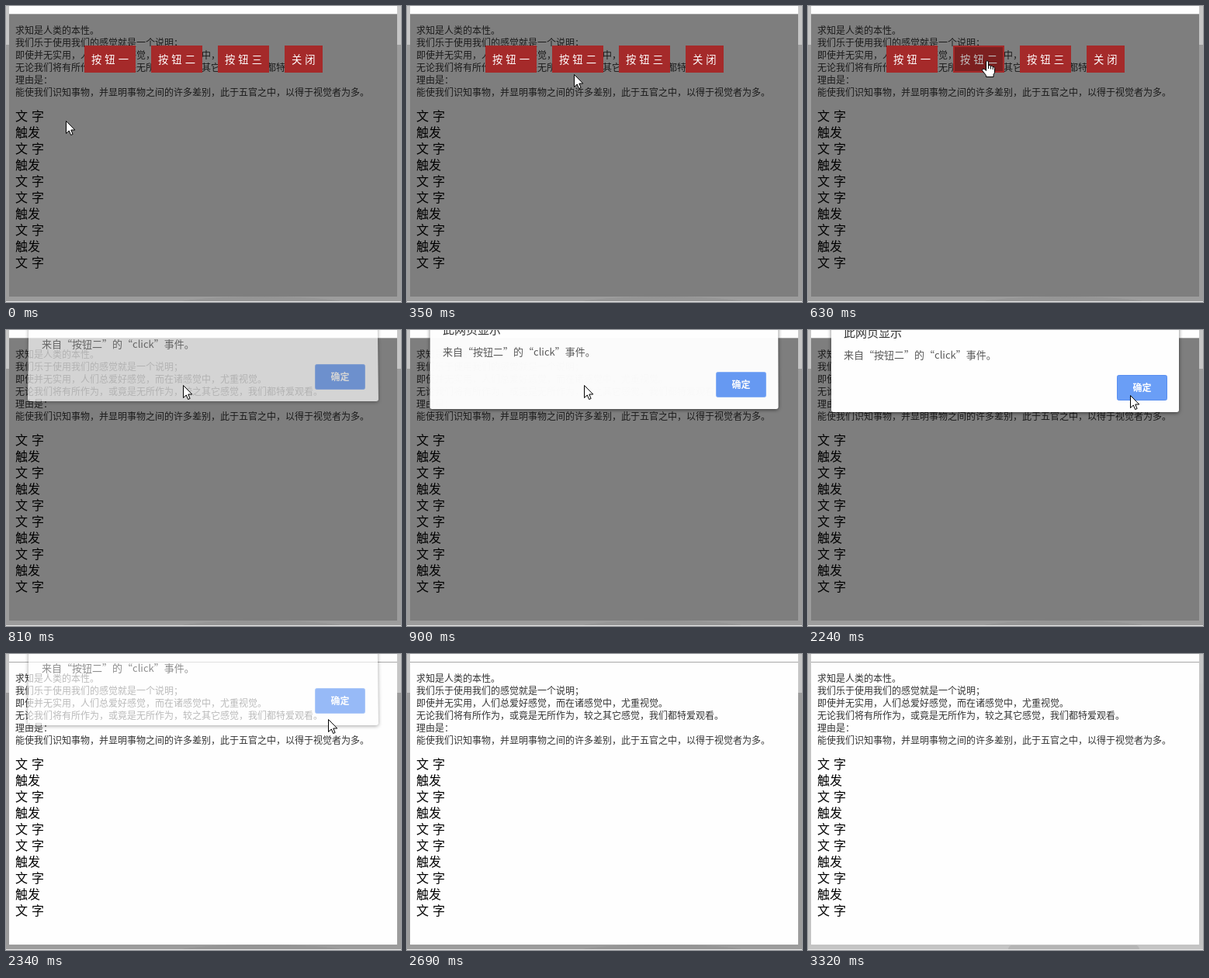
An HTML page with a canvas for the animation above (3.41 s loop, 509 by 382 pixels).

```html
<!DOCTYPE html>
<html lang="zh-CN">
<head>
<meta charset="utf-8">
<title>弹层与按钮</title>
<style>
html, body { margin: 0; width: 100%; height: 100%; overflow: hidden; background: #fefefe; }
canvas { display: block; width: 509px; height: 382px; }
</style>
</head>
<body>
<canvas id="stage" width="509" height="382" lang="zh-CN"></canvas>
<script>
const stage = document.getElementById('stage');
const layer = stage.cloneNode();
const stageCtx = stage.getContext('2d');
const layerCtx = layer.getContext('2d');
let ctx = stageCtx;

const LOOP = 3410;
const FAMILY = '"Noto Sans CJK SC", "Noto Sans CJK", "Noto Sans", sans-serif';

const PARAGRAPH = [
  '求知是人类的本性。',
  '我们乐于使用我们的感觉就是一个说明；',
  '即使并无实用，人们总爱好感觉，而在诸感觉中，尤重视觉。',
  '无论我们将有所作为，或竟是无所作为，较之其它感觉，我们都特爱观看。',
  '理由是：',
  '能使我们识知事物，并显明事物之间的许多差别，此于五官之中，以得于视觉者为多。'
];
const ITEMS = ['文 字', '触发', '文 字', '触发', '文 字', '文 字', '触发', '文 字', '触发', '文 字'];
const BUTTONS = [['按 钮 一', 101, 66], ['按 钮 二', 187, 66], ['按 钮 三', 273, 66], ['关 闭', 359, 49]];

// Pointer: time, x, y, shape ('' hides it)
const POINTER = [
  [0, 78, 148, 'arrow'], [80, 88, 143, 'arrow'], [170, 122, 126, 'arrow'],
  [260, 168, 104, 'arrow'], [350, 216, 88, 'arrow'], [440, 240, 72, 'hand'],
  [540, 234, 70, 'hand'], [630, 232, 70, 'hand'], [810, 229, 71, 'arrow'],
  [1070, 236, 76, 'arrow'], [1160, 276, 88, 'arrow'], [1260, 332, 87, 'arrow'],
  [1340, 368, 87, 'arrow'], [1430, 391, 87, 'arrow'], [1510, 399, 87, 'arrow'],
  [1610, 404, 87, 'arrow'], [1700, 407, 87, 'arrow'], [1890, 410, 86, 'arrow'],
  [1980, 413, 85, 'arrow'], [2070, 415, 84, 'arrow'], [2160, 416, 84, 'arrow'],
  [2510, 438, 128, 'arrow'], [2600, 484, 216, 'arrow'], [2690, 0, 0, ''],
  [2870, 496, 373, 'arrow'], [2960, 0, 0, '']
];

// Dialog: time, vertical shift, edge spread, opacity
const DIALOG = [
  [0, 0, 0, 0], [810, -14, 2, 0.67], [900, -4, 0.6, 0.98], [980, 0, 0, 1],
  [2340, -14, 2, 0.67], [2420, -20, 3, 0.25], [2510, 0, 0, 0]
];

// Darkening of the second button
const HOVER = [[0, 0], [440, 0.35], [540, 0.7], [630, 1]];

const at = (keys, t) => keys.findLast(key => key[0] <= t).slice(1);

function rect(x, y, w, h, color) {
  ctx.fillStyle = color;
  ctx.fillRect(x, y, w, h);
}

function text(str, x, y, size, color, gap = 0, weight = 400) {
  ctx.font = `${weight} ${size}px ${FAMILY}`;
  ctx.wordSpacing = gap + 'px';
  ctx.fillStyle = color;
  ctx.fillText(str, x, y);
}

// Paints a group apart and blends it in as one piece.
function blend(alpha, paint) {
  ctx = layerCtx;
  ctx.clearRect(0, 0, 509, 382);
  paint();
  ctx = stageCtx;
  ctx.globalAlpha = alpha;
  ctx.drawImage(layer, 0, 0);
  ctx.globalAlpha = 1;
}

function drawDesktop(light) {
  rect(0, 0, 509, 382, light ? '#c4c4c4' : '#9c9c9c');
  rect(0, 0, 509, light ? 38 : 50, '#c6c6c6');
  ctx.fillStyle = light ? '#b4b4b4' : '#959595';
  ctx.beginPath();
  if (light) ctx.roundRect(258, 376, 169, 12, 5);
  else ctx.ellipse(329, 385, 112, 10, 0, 0, Math.PI * 2);
  ctx.fill();
  rect(0, 381, 509, 1, '#e6e6e6');
}

function drawPage() {
  rect(4, 0, 500, 375, '#fefefe');
  rect(4, 10, 500, 1, '#a8a8a8');
  PARAGRAPH.forEach((line, i) => text(line, 12, 36 + i * 16, 12, '#333'));
  ITEMS.forEach((item, i) => text(item, 12, 148 + i * 21, 16, '#000', 1.4));
}

function drawButtons(hover) {
  BUTTONS.forEach(([label, x, w], i) => {
    rect(x, 51, w, 35, '#a52a2a');
    text(label, x + 9, 74, 13.33, '#fff', 1);
    if (i === 1 && hover) rect(x + 2, 53, w - 4, 31, `rgba(0,0,0,${0.25 * hover})`);
  });
}

function drawDialog(shift, spread, hot) {
  ctx.save();
  ctx.translate(0, shift);
  ctx.save();
  ctx.shadowColor = 'rgba(0,0,0,0.55)';
  ctx.shadowBlur = 5;
  ctx.shadowOffsetY = 1;
  ctx.fillStyle = '#fefefe';
  ctx.beginPath();
  ctx.moveTo(30, -60);
  ctx.lineTo(478, -60);
  ctx.arcTo(478 + spread, 106, 30, 106, 3);
  ctx.arcTo(30 - spread, 106, 30, -60, 3);
  ctx.closePath();
  ctx.fill();
  ctx.restore();
  text('此网页显示', 46, 9, 15, '#333');
  text('来自“按钮二”的“click”事件。', 46, 37, 13, '#5a5a5a');
  ctx.fillStyle = hot ? '#6a9ef6' : '#669af5';
  ctx.strokeStyle = hot ? '#5a8ff0' : '#86b0f8';
  ctx.lineWidth = 1;
  ctx.beginPath();
  ctx.roundRect(398.5, 58.5, 64, 32, 2);
  ctx.fill();
  ctx.stroke();
  text('确定', 418.5, 79, 12, '#fff', 0, 700);
  ctx.restore();
}

const ARROW = new Path2D('M.5 .5V16.5L4.3 13L6.6 18.5L9.1 17.5L6.8 12H11.8Z');
const HAND = new Path2D('M-1.5 1.5Q0 0 1.5 1.5V7Q3.3 5.8 4.2 7.6Q6 6.6 7 8.4' +
  'Q9.5 7.8 9.5 10.5V15Q9.5 17 8 18.5V21.5H-1.5V19.5L-6.3 13.5Q-7 11 -5 11' +
  'Q-3 11.4 -1.5 13.5Z');
const KNUCKLES = new Path2D('M1.5 6V11M4.4 8V11.5M7.2 9V12');

function drawPointer(x, y, shape) {
  if (!shape) return;
  const path = shape === 'hand' ? HAND : ARROW;
  ctx.save();
  ctx.translate(x - 1, y);
  ctx.fillStyle = '#fff';
  ctx.strokeStyle = '#000';
  ctx.lineWidth = 1;
  ctx.fill(path);
  ctx.stroke(path);
  if (shape === 'hand') ctx.stroke(KNUCKLES);
  ctx.restore();
}

function draw(t) {
  drawDesktop(t >= 3320);
  drawPage();
  if (t < 2340) rect(4, 11, 500, 364, 'rgba(0,0,0,0.5)');
  if (t < 810) drawButtons(at(HOVER, t)[0]);
  const [shift, spread, alpha] = at(DIALOG, t);
  const hot = t >= 1890 && t < 2340;
  if (alpha) blend(alpha, () => drawDialog(shift, spread, hot));
  drawPointer(...at(POINTER, t));
}

const start = performance.now();
function tick() {
  draw((performance.now() - start) % LOOP);
  requestAnimationFrame(tick);
}
tick();
</script>
</body>
</html>
```
